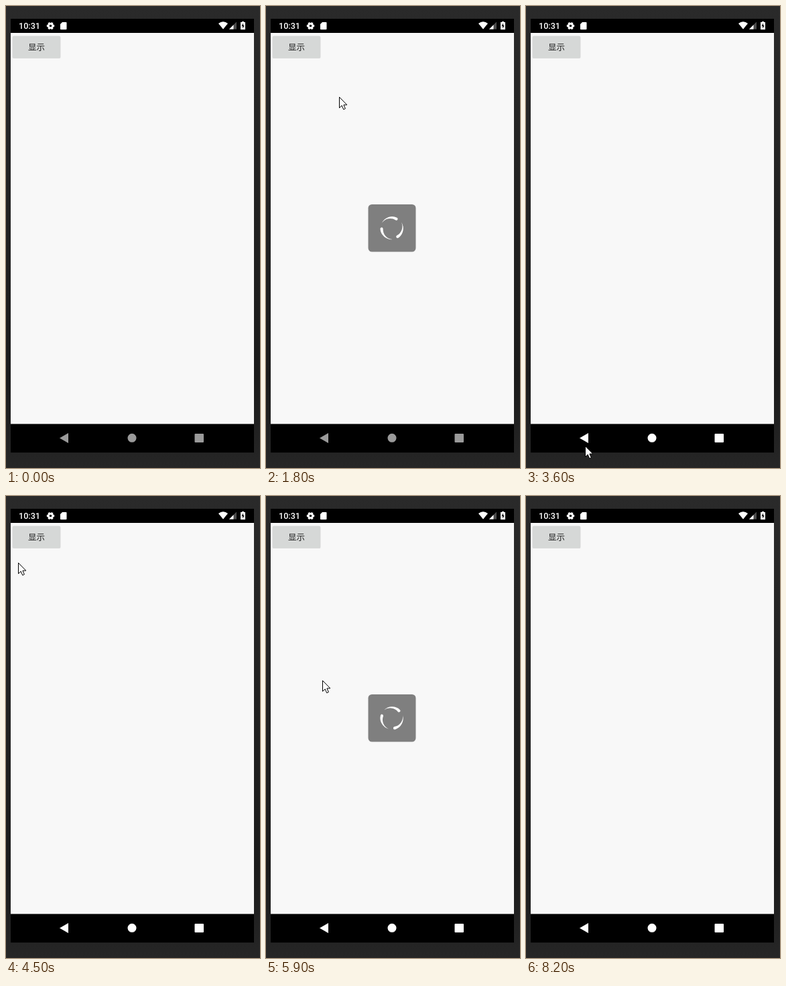
Write an HTML page that moves like this. It is 379x687 px and loops after 9 s.

```html
<!DOCTYPE html>
<html lang="zh">
<head>
<meta charset="utf-8">
<style>
  html, body { margin: 0; width: 100%; height: 100%; overflow: hidden; background: #202020; }
  svg { display: block; }
</style>
</head>
<body>
<svg width="379" height="687" viewBox="0 0 379 687">
  <defs>
    <linearGradient id="desk" x2="0" y2="1">
      <stop offset="0" stop-color="#2a2a2a"/>
      <stop offset=".8" stop-color="#1b1b1b"/>
      <stop offset="1" stop-color="#262626"/>
    </linearGradient>
    <path id="comet" d="M.6-16.700A17 17 0 0 1 17.400 0A2.100 2.100 0 0 1 13.200 0A15 15 0 0 0 .6-16.700Z"/>
  </defs>
  <rect width="379" height="687" fill="url(#desk)"/>
  <rect x="7" y="19" width="363" height="645"/>
  <rect x="7" y="40" width="363" height="581.5" fill="#f8f8f8"/>

  <!-- status bar -->
  <g fill="#fff">
    <text x="19" y="34.3" font-family="Roboto, sans-serif" font-weight="500" font-size="12.6">10:31</text>
    <g fill="none" stroke="#fff" transform="translate(66.5 29.5)">
      <circle r="3.2" stroke-width="2.8"/>
      <circle r="4.8" stroke-width="1.8" pathLength="12" stroke-dasharray="1.2 .8" stroke-dashoffset=".6"/>
    </g>
    <path d="M84 24H89.500Q90.500 24 90.500 25V34Q90.500 35 89.500 35H82Q81 35 81 34V27Z"/>
    <path d="M317 26Q324 20.500 331 26L324 34.500Z"/>
    <path d="M344 23.500V34.500H333Z" fill="#4d4d4d"/>
    <path d="M339.500 28V34.500H333Z"/>
    <path d="M352 24V23H355V24H357V35H350V24Z"/>
    <path d="M354 25.500L351.500 30H353.200V33.500L355.700 28.800H354Z" fill="#000"/>
  </g>

  <rect x="9.500" y="45" width="72" height="33" rx="2" opacity=".12"/>
  <rect id="button" x="10" y="44.500" width="71" height="32.500" rx="1.500"/>
  <text x="45.500" y="65.700" text-anchor="middle" font-family="'Noto Sans CJK SC', 'Noto Sans CJK', sans-serif" font-size="12.5" fill="#222">显示</text>

  <g id="nav">
    <path d="M80 642.500L93 635V650Z"/>
    <circle cx="188" cy="642.300" r="6.500"/>
    <rect x="281.500" y="636" width="13.500" height="13" rx="1"/>
  </g>

  <g id="dialog">
    <rect x="152.500" y="295" width="71" height="70.500" rx="5.500" fill="#7f7f7f"/>
    <g id="spinner" fill="#fff">
      <use href="#comet"/>
      <use href="#comet" transform="rotate(120)"/>
      <use href="#comet" transform="rotate(240)"/>
    </g>
  </g>

  <path id="cursor" d="M.5.5V16.500L4.200 13L6.700 18.800L9.400 17.600L6.900 12H11.800Z" fill="#fff" stroke="#000"/>
</svg>
<script>
const LOOP = 9000, STEP = 100;
const el = id => document.getElementById(id);
const set = (id, name, value) => el(id).setAttribute(name, value);
const show = (id, on) => el(id).style.display = on ? '' : 'none';
const between = (t, from, to) => t >= from && t < to;

function ease(t, from, to) {
  const k = Math.min(1, Math.max(0, (t - from) / (to - from)));
  return k * k * (3 - 2 * k);
}

// The pointer glides to each place in turn and rests there
const entry = { x: 409, y: 90 };
const glides = [
  { from: 0, to: 600, x: 51, y: 61 },       // button
  { from: 1500, to: 2300, x: 235, y: 296 },
  { from: 2300, to: 2500, x: 144, y: 319 },
  { from: 2500, to: 3000, x: 88, y: 654 },  // back key
  { from: 3950, to: 4500, x: 18, y: 99 },
  { from: 4500, to: 4900, x: 42, y: 64 },   // button
  { from: 5400, to: 5900, x: 84, y: 274 },
  { from: 5900, to: 6500, x: 92, y: 645 },  // back key
  { from: 7500, to: 8100, x: 365, y: 147 }
];

function pointerAt(t) {
  let { x, y } = entry;
  for (const glide of glides) {
    const k = ease(t, glide.from, glide.to);
    x += (glide.x - x) * k;
    y += (glide.y - y) * k;
  }
  return `${Math.round(x)} ${Math.round(y)}`;
}

function draw(t) {
  const pressed = between(t, 1200, 1400) || between(t, 5100, 5300);
  const loading = between(t, 1500, 3500) || between(t, 5300, 7300);
  const lit = between(t, 3500, 6500) || t >= 7300;
  // one turn per second, each showing with its own start angle
  const angle = t * .36 + (t < 4500 ? -112 : 110);

  set('button', 'fill', pressed ? '#babcbb' : '#d6d8d7');
  set('nav', 'fill', lit ? '#fff' : '#9a9a9a');
  show('dialog', loading);
  set('spinner', 'transform', `translate(187.8 330.4) rotate(${angle})`);
  show('cursor', between(t, 200, 8200));
  set('cursor', 'transform', `translate(${pointerAt(t)})`);
}

const start = performance.now();
function tick() {
  const t = (performance.now() - start) % LOOP;
  draw(Math.floor(t / STEP) * STEP);
  requestAnimationFrame(tick);
}
tick();
</script>
</body>
</html>
```
